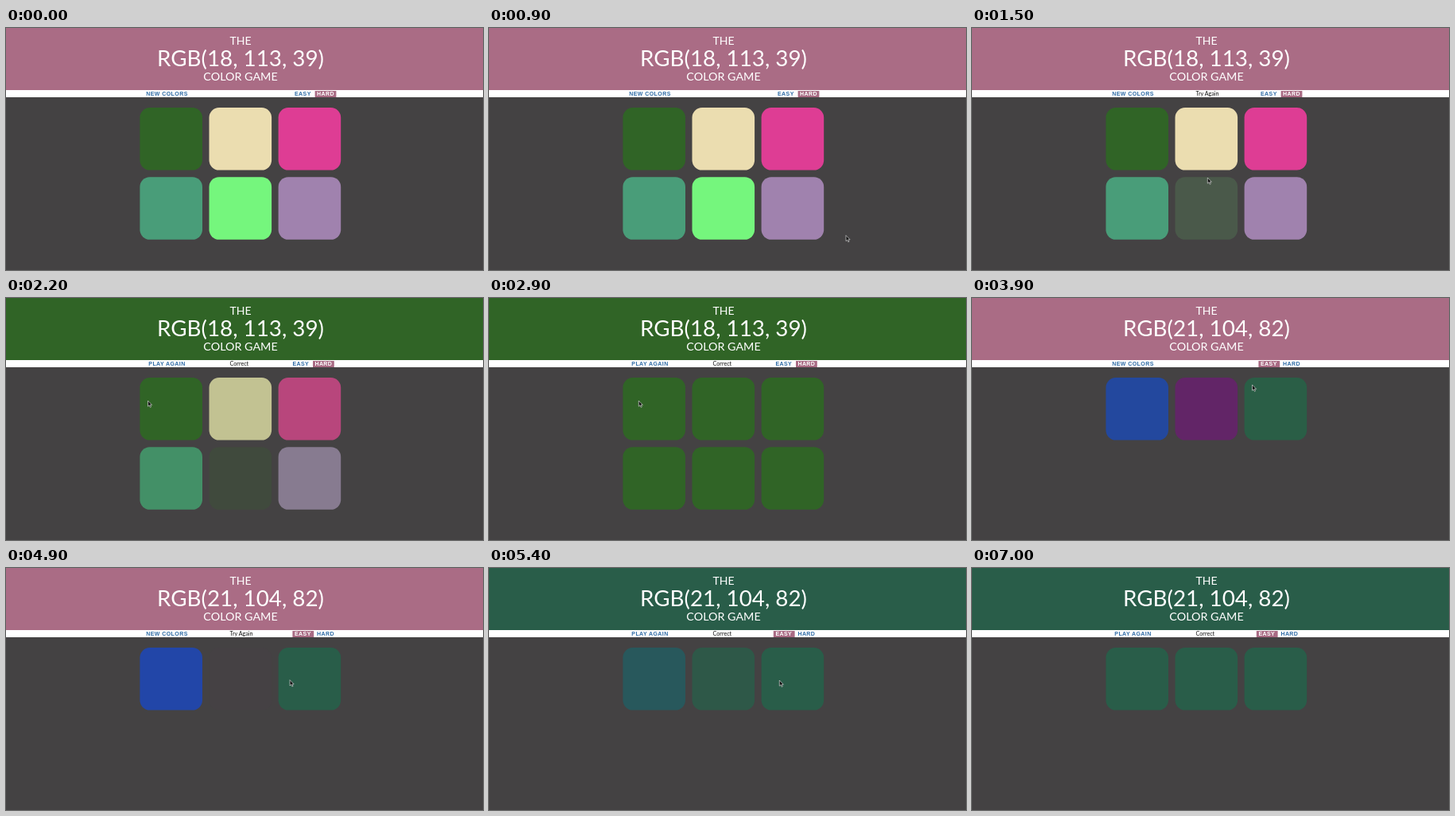
These frames come from a looping animation (600 px wide and 304 px high, 7.1 s). An HTML page:

```html
<!DOCTYPE html>
<html lang="en">
<head>
<meta charset="utf-8">
<title>Color Game</title>
<style>
  html, body { margin: 0; width: 100%; height: 100%; overflow: hidden; background: #444243; }
  svg { display: block; width: 600px; height: 304px; }
  .head { font-family: Lato, sans-serif; fill: #fff; text-anchor: middle; }
  .btn { font: bold 7px "Liberation Sans", Arial, sans-serif; letter-spacing: .42px; fill: #2f6ca6; }
  .msg { font: 7.2px Lato, sans-serif; fill: #111; }
</style>
</head>
<body>
<svg viewBox="0 0 600 304">
  <rect width="600" height="304" fill="#444243"/>
  <rect id="header" width="600" height="78"/>
  <g class="head">
    <text x="295" y="20.8" font-size="14">THE</text>
    <text id="goal" x="295" y="48" font-size="27.8"></text>
    <text x="295" y="66.3" font-size="14.3">COLOR GAME</text>
  </g>
  <rect y="78" width="600" height="9" fill="#fff"/>
  <text id="reset" class="btn" y="85.3"></text>
  <text id="msg" class="msg" x="281.5" y="85.4"></text>
  <g id="modes">
    <rect id="mark" y="79" width="26.8" height="8" fill="#a96b84"/>
    <text id="easy" class="btn" x="363" y="85.3">EASY</text>
    <text id="hard" class="btn" x="391" y="85.3">HARD</text>
  </g>
  <g id="board"></g>
  <path id="cursor" d="M0 0V7.2L1.7 5.7L2.8 8.3L4 7.8L2.9 5.3H5.1Z" fill="#111" stroke="#eee" stroke-width=".6"/>
</svg>
<script>
const LOOP = 7100, STEP = 100, FADE = 600;
const PINK = [170, 108, 133], BACK = [68, 66, 67];
const LEAF = [48, 100, 38], PINE = [41, 93, 73];
const WRONG = 1150, WIN = 2100, EASY = 3500, WRONG2 = 4400, WIN2 = 5100;

// Each tile: start color, then [time, color] changes.
const tiles = [
  [LEAF, [EASY, [34, 70, 168]], [WIN2, PINE]],
  [[235, 221, 176], [WIN, LEAF], [EASY, [102, 32, 108]], [WRONG2, BACK], [WIN2, PINE]],
  [[222, 61, 148], [WIN, LEAF], [EASY, PINE]],
  [[73, 157, 121], [WIN, LEAF]],
  [[117, 246, 125], [WRONG, BACK], [WIN, LEAF]],
  [[160, 130, 174], [WIN, LEAF]]
];

// Pointer stops: time, x, y.
const path = [
  [700, 589, 296], [1100, 309, 225], [1500, 296.3, 188], [2000, 178.5, 129],
  [2200, 178.5, 129], [2700, 188.3, 129], [3000, 188.3, 129], [3400, 372, 81],
  [3600, 372, 81], [3900, 352.5, 109], [4300, 300, 138], [4550, 300, 138],
  [5000, 365.3, 141], [6700, 365.3, 141]
];

const $ = id => document.getElementById(id);
const rgb = c => `rgb(${c.map(Math.round)})`;
const lerp = (a, b, k) => a + (b - a) * k;
const mix = (a, b, k) => a.map((v, i) => lerp(v, b[i], k));

// CSS "ease" curve: cubic-bezier(.25, .1, .25, 1)
function ease(x) {
  if (x <= 0) return 0;
  if (x >= 1) return 1;
  const bez = (a, b, s) => 3 * a * s * (1 - s) ** 2 + 3 * b * s * s * (1 - s) + s ** 3;
  let lo = 0, hi = 1;
  for (let i = 0; i < 20; i++) {
    const s = (lo + hi) / 2;
    if (bez(.25, .25, s) < x) lo = s; else hi = s;
  }
  return bez(.1, 1, lo);
}

const rects = tiles.map((_, i) => {
  const r = document.createElementNS("http://www.w3.org/2000/svg", "rect");
  const attrs = { x: 168.4 + i % 3 * 87.1, y: 100 + (i > 2) * 87.2, width: 78.6, height: 78.6, rx: 12.5 };
  for (const k in attrs) r.setAttribute(k, attrs[k]);
  return $("board").appendChild(r);
});

function tileColor([start, ...changes], t) {
  return changes.reduce((c, [at, to]) => mix(c, to, ease((t - at) / FADE)), start);
}

function moveCursor(t) {
  const i = path.findIndex(p => p[0] > t);
  const shown = i > 0;
  $("cursor").style.display = shown ? "" : "none";
  if (!shown) return;
  const [t0, x0, y0] = path[i - 1], [t1, x1, y1] = path[i];
  const k = (t - t0) / (t1 - t0), s = k * k * (3 - 2 * k);
  $("cursor").setAttribute("transform", `translate(${lerp(x0, x1, s)} ${lerp(y0, y1, s)})`);
}

function draw(t) {
  const easy = t >= EASY;
  const won = easy ? t >= WIN2 : t >= WIN;
  const missed = easy ? t >= WRONG2 : t >= WRONG;
  $("header").setAttribute("fill", rgb(!won ? PINK : easy ? PINE : LEAF));
  $("goal").textContent = easy ? "RGB(21, 104, 82)" : "RGB(18, 113, 39)";
  $("reset").textContent = won ? "PLAY AGAIN" : "NEW COLORS";
  $("reset").setAttribute("x", won ? 179.3 : 176.3);
  $("msg").textContent = won ? "Correct" : missed ? "Try Again" : "";
  $("modes").setAttribute("transform", `translate(${won ? -2.6 : 0})`);
  $("mark").setAttribute("x", easy ? 360.4 : 388.6);
  $("easy").style.fill = easy ? "#fff" : "";
  $("hard").style.fill = easy ? "" : "#fff";
  rects.forEach((r, i) => {
    r.style.display = easy && i > 2 ? "none" : "";
    r.setAttribute("fill", rgb(tileColor(tiles[i], t)));
  });
  moveCursor(t);
}

function tick() {
  const t = performance.now() % LOOP;
  draw(Math.floor(t / STEP) * STEP);
  requestAnimationFrame(tick);
}
tick();
</script>
</body>
</html>
```
